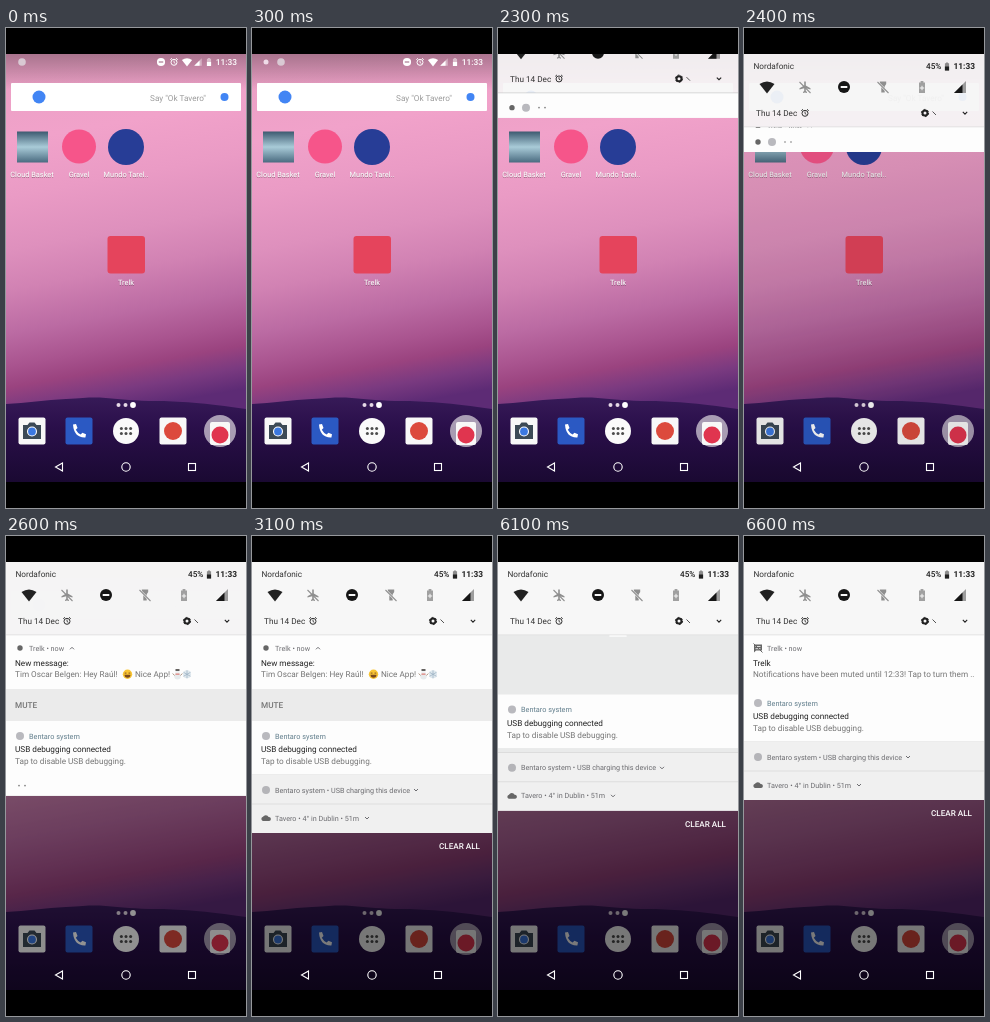
An HTML page that plays this animation: 240x480 px, repeating every 8000 ms.

```html
<!DOCTYPE html>
<html lang="en">
<head>
<meta charset="utf-8">
<title>Notification shade</title>
<style>
  html, body { margin: 0; width: 100%; height: 100%; overflow: hidden; background: #000; }
  svg { display: block; width: 100%; height: 100%; }
  text { font-family: Roboto, "Noto Sans", sans-serif; white-space: pre; text-rendering: geometricPrecision; }
</style>
</head>
<body>
<svg id="stage" viewBox="0 0 240 480" xmlns="http://www.w3.org/2000/svg"></svg>
<script>
const LOOP = 8000, STEP = 100;
const HEADER_END = 99, SHELF = 24, PEEK = 124, FULL = 297;
const INK = '#212121', GREY = '#757575', SMALL = '#6c6c70';

// Drawing helpers
const text = (x, y, str, size, fill, extra = '') =>
  `<text x="${x}" y="${y}" font-size="${size}" fill="${fill}" ${extra}>${str}</text>`;
const rect = (x, y, w, h, fill, extra = '') =>
  `<rect x="${x}" y="${y}" width="${w}" height="${h}" fill="${fill}" ${extra}/>`;
const dot = (x, y, r, fill, extra = '') =>
  `<circle cx="${x}" cy="${y}" r="${r}" fill="${fill}" ${extra}/>`;
const path = (d, fill, extra = '') => `<path d="${d}" fill="${fill}" ${extra}/>`;
const line = (d, color, width = 1) =>
  path(d, 'none', `stroke="${color}" stroke-width="${width}"`);
const at = (x, y, body, scale = 1) =>
  `<g transform="translate(${x} ${y}) scale(${scale})">${body}</g>`;
const group = (id, body, extra = '') => `<g id="${id}" ${extra}>${body}</g>`;
const medium = 'font-weight="500"';
const bold = 'font-weight="700"';
const middle = 'text-anchor="middle"';
const end = 'text-anchor="end"';

// Icons, each centred on 0,0
const wifi = c => path('M0 6.5L-7.5 -3Q0 -8 7.5 -3Z', c);
const signal = c => path('M-6 6H6V-6Z', c, 'opacity=".4"') + path('M-6 6H2.5V-2.5Z', c);
const battery = c => path('M-2.6 -4H-1.2V-5H1.2V-4H2.6V5H-2.6Z', c, 'opacity=".5"') +
  rect(-2.6, 0, 5.2, 5, c);
const batteryPlus = c => path('M-3 -4.6H-1.4V-6H1.4V-4.6H3V6H-3Z', c) +
  line('M0 -1.2V3.2M-2.2 1H2.2', '#f7f7f7', 1);
const noEntry = (c, bar) => dot(0, 0, 6, c) + rect(-3.3, -1, 6.6, 2, bar);
const alarm = c => dot(0, 0.3, 3, 'none', `stroke="${c}" stroke-width="1"`) +
  line('M0 -1.5V0.5L1.4 1.4M-3.8 -2.2L-2 -3.8M3.8 -2.2L2 -3.8', c, 0.9);
const chevron = (c, up) => line(up ? 'M-2 1L0 -1L2 1' : 'M-2 -1L0 1L2 -1', c, 1);
const plane = c => path('M-0.8 -5.5H0.8V-1.6L5.5 1.2V2.6L0.8 1.2V4L2 5V6L0 5.4L-2 6V5L-0.8 4V1.2L-5.5 2.6V1.2L-0.8 -1.6Z', c) +
  line('M-5.5 -5L5.5 6', c, 1.1);
const torch = c => path('M-3.2 -5.5H3.2V-3L1.7 -0.8V5.5H-1.7V-0.8L-3.2 -3Z', c) +
  line('M-5 -4.5L5 5.5', '#f7f7f7', 2.2) + line('M-5.5 -5L5.5 6', c, 1.1);
const gear = c => dot(0, 0, 2.5, 'none', `stroke="${c}" stroke-width="2"`) +
  dot(0, 0, 3.6, 'none', `stroke="${c}" stroke-width="1" stroke-dasharray="1.885"`);
const cloud = c => path('M-3.2 3A2.2 2.2 0 0 1 -3 -1.2A3.1 3.1 0 0 1 2.6 -1A2 2 0 0 1 3.2 3Z', c);
const ball = c => dot(0, 0, 4, c);
const muted = c => path('M-4 -3.5H4V2.5H-2L-4 4.5Z', c) +
  line('M-2.5 -1.5H2.5M-2.5 0.7H2.5', '#fdfdfd', 0.8) + line('M-4.5 -4.5L4.5 4.5', c, 1);

const label = (x, y, str) => text(x, y, str, 7.4, '#fff', `${middle} filter="url(#shade)"`);
const tile = (x, y, fill) => rect(x - 13.5, y - 13.5, 27, 27, fill, 'rx="2"');

function wallpaper() {
  return rect(0, 26, 240, 428, 'url(#sky)') + rect(0, 26, 240, 36, 'url(#scrim)') +
    path('M0 376C20 375 40 372 60 371S85 369 100 370S130 373 150 373S200 375 240 381V454H0Z', 'url(#hill)');
}

function homeStatus() {
  return group('newDot', dot(14, 34, 2.5, '#efdce8')) +
    group('oldDot', dot(0, 34, 3.8, '#d9c9d3')) +
    at(155, 34, noEntry('#fff', '#b48aa0'), 0.68) +
    at(168, 34, alarm('#fff')) + at(181, 34, wifi('#fff'), 0.68) +
    at(192, 34, signal('#fff'), 0.62) + at(203, 34, battery('#fff'), 0.8) +
    text(231, 37, '11:33', 8.4, '#fff', `${end} ${medium}`);
}

function homePage() {
  const apps = [[26, 'Cloud Basket'], [73, 'Gravel'], [120, 'Mundo Tarel..']];
  return rect(5, 55, 230, 28, '#fff', 'rx="1"') + dot(33, 69, 6.5, '#4285f4') +
    text(200, 72.8, 'Say "Ok Tavero"', 8.2, '#9b9b9b', end) + dot(218.5, 69, 4, '#4285f4') +
    rect(11, 103.5, 31, 31, 'url(#photo)') + dot(73, 118.5, 17, '#f6558a') +
    dot(120, 119, 18, '#273d96') +
    apps.map(([x, name]) => label(x, 149, name)).join('') +
    rect(101.5, 208, 37.5, 37.5, '#e5445c', 'rx="3"') + label(120, 256.5, 'Trelk');
}

function dock() {
  const gridDots = [-4.6, 0, 4.6].flatMap(x => [-2.4, 2.4].map(y => dot(120 + x, 403 + y, 1.5, '#4c4c4c')));
  return dot(112.5, 377, 2, '#e6d9e6') + dot(119.5, 377, 2, '#e6d9e6') + dot(127, 377, 2.9, '#fff') +
    tile(26, 403, '#f8f8f8') +
    path('M17 397H21.5L23.5 394.5H28.5L30.5 397H35V411H17Z', '#3c4a56') +
    dot(26, 403.5, 5, '#fff') + dot(26, 403.5, 3.9, '#3b78e0') +
    tile(73, 403, '#2b59c3') +
    path('M67 396.5L70 396L71.5 400L69.8 401.8Q71.5 405 74.6 406.5L76.4 404.7L80 406.2L79.4 409.4Q68 410 67 396.5Z', '#fff') +
    dot(120, 403, 13, '#fafafa') + gridDots.join('') +
    tile(167, 403, '#f8f8f8') + dot(167, 403, 9, '#dc4a3d') +
    dot(214, 403, 16, '#d9d2dc', 'opacity=".72"') +
    rect(204, 394, 20, 23, '#f8f8f8', 'rx="2"') + dot(214, 407, 8.5, '#e0354f');
}

function nav() {
  const stroke = 'stroke="#fff" stroke-width="1.1"';
  return path('M49.5 439L56.5 435V443Z', 'none', stroke) +
    dot(120, 439, 4.2, 'none', stroke) + rect(182.5, 435.5, 7, 7, 'none', stroke);
}

function header() {
  const toggles = [[23, wifi(INK)], [61, plane('#8f8f8f')], [100, noEntry('#161616', '#f7f7f7')],
    [139, torch('#8f8f8f')], [178, batteryPlus('#a0a0a0')], [216, signal('#161616')]];
  return rect(0, 26, 240, 73, '#f7f7f7', 'id="headerBg"') +
    text(9.5, 41, 'Nordafonic', 8.2, '#333') +
    text(182, 41, '45%', 8.2, INK, medium) + at(203, 38.5, battery(INK), 0.8) +
    text(231, 41, '11:33', 8.4, INK, `${end} ${bold}`) +
    toggles.map(([x, icon]) => at(x, 59, icon)).join('') +
    text(12, 88, 'Thu 14 Dec', 8.2, '#333') + at(61, 85, alarm('#333')) +
    at(181, 85, gear(INK)) + line('M188.5 83.5L192 87', '#555', 1) +
    at(221, 85, chevron(INK), 1.1) + rect(0, 98.5, 240, 0.8, '#dedede');
}

const face = dot(0, 0, 4.7, '#f9c534') + path('M-3 0.5H3A3 3 0 0 1 -3 0.5Z', '#7b4a1e') +
  line('M-2.8 -1.2H-1M1 -1.2H2.8', '#7b4a1e', 0.9);
const snowman = dot(0, 2, 3.2, '#e6eaec') + dot(0, -2, 2.2, '#eef1f2') +
  rect(-2, -5.2, 4, 1.8, '#55514f') + line('M-2 -0.2H2', '#d9534a', 0.9) +
  line('M-3 1.2L-4.8 -0.8M3 1.2L4.8 -0.8', '#8a6a50', 0.7);
const flake = dot(0, 0, 4, '#dfe8ee') +
  line('M0 -4V4M-3.5 -2L3.5 2M-3.5 2L3.5 -2', '#9fb4c4', 0.8);

function oldCard() {
  return dot(14, 112, 2.7, '#666') +
    text(23, 115, 'Trelk • now', 7.2, SMALL) + at(66, 112.3, chevron(SMALL, true)) +
    text(9, 130, 'New message:', 8.2, INK) +
    text(9, 141.3, 'Tim Oscar Belgen: Hey Raúl!', 8.2, GREY) +
    at(121.5, 138.3, face) + text(129, 141.3, 'Nice App!', 8.2, GREY) +
    at(171.5, 138.3, snowman) + at(181, 138.3, flake) +
    rect(0, 153, 240, 32, '#ebebeb') + rect(0, 153, 240, 32, '#000', 'id="ripple"') +
    text(9, 172, 'MUTE', 8.2, GREY, medium);
}

function newCard() {
  return at(14, 112, muted('#666')) +
    text(23, 115, 'Trelk • now', 7.2, SMALL) + text(9, 129.5, 'Trelk', 8.2, INK) +
    text(9, 141.3, 'Notifications have been muted until 12:33! Tap to turn them ..', 8.2, GREY);
}

function usbCard() {
  return rect(0, 185, 240, 53.5, '#fdfdfd') + at(14, 200, ball('#b9b9be')) +
    text(23, 202.7, 'Bentaro system', 7.3, '#607d8b') +
    text(9, 216, 'USB debugging connected', 8.2, INK) +
    text(9, 228, 'Tap to disable USB debugging.', 8.2, GREY);
}

function minorCards() {
  return rect(0, 238.5, 240, 58.5, '#f0f0f0') + rect(0, 238.2, 240, 0.8, '#d9d9d9') +
    rect(0, 267.6, 240, 0.8, '#d9d9d9') +
    at(14, 254, ball('#b4b4b8')) +
    text(23, 256.6, 'Bentaro system • USB charging this device', 7.2, SMALL) +
    at(164, 254, chevron(SMALL)) +
    at(14, 282, cloud('#666')) +
    text(23, 284.6, 'Tavero • 4° in Dublin • 51m', 7.2, SMALL) + at(115, 282, chevron(SMALL));
}

const shelfIcons = [dot(0, 0, 2.7, '#666'), ball('#b9b9be'), dot(-1, 0, 0.8, '#777'), dot(-9, 0, 0.8, '#777')];
const cardTops = [100, 185, 239, 268];

const gradient = (id, list, axis = 'x2="0" y2="1"') => `<linearGradient id="${id}" ${axis}>${
  list.map(([o, c, a = 1]) => `<stop offset="${o}" stop-color="${c}" stop-opacity="${a}"/>`).join('')}</linearGradient>`;

document.getElementById('stage').innerHTML = `<defs>
  ${gradient('sky', [[0, '#eaa0c4'], [0.2, '#f1a2ca'], [0.35, '#ea9bc5'], [0.5, '#de90bd'], [0.61, '#d182b3'],
    [0.73, '#bb6ba3'], [0.82, '#a9548f'], [0.88, '#9a437f'], [0.94, '#7a3a80'], [1, '#5d2b75']],
    'gradientUnits="userSpaceOnUse" x1="90" y1="26" x2="153" y2="376"')}
  ${gradient('scrim', [[0, '#000', 0.28], [1, '#000', 0]])}
  ${gradient('hill', [[0, '#371a58'], [0.35, '#2a0f4a'], [1, '#1a0932']])}
  ${gradient('photo', [[0, '#3c5a70'], [0.5, '#a9cbd8'], [1, '#4a6b80']])}
  <filter id="shade" x="-20%" y="-40%" width="140%" height="200%">
    <feDropShadow dx="0" dy=".6" stdDeviation=".6" flood-opacity=".6"/></filter>
  <clipPath id="panelClip"><rect id="panelBox" width="240"/></clipPath>
  <clipPath id="cardClip"><rect id="cardBox" y="99"/></clipPath>
</defs>` +
  wallpaper() + group('status', homeStatus()) + homePage() + dock() +
  rect(0, 26, 240, 428, '#000', 'id="dim"') + nav() +
  group('panel',
    rect(0, 26, 240, 428, '#e9eaea') +
    group('stack',
      group('minor', minorCards()) + group('usb', usbCard()) +
      group('first', rect(0, 99, 240, 86, '#fdfdfd') + group('before', oldCard()) + group('after', newCard()),
        'clip-path="url(#cardClip)"')) +
    group('shelf', rect(0, 0, 240, SHELF, '#fdfdfd') +
      shelfIcons.map((icon, i) => group('shelf' + i, icon)).join('')),
    'clip-path="url(#panelClip)"') +
  group('header', header()) +
  group('clear', text(228, 313, 'CLEAR ALL', 8.15, '#fff', `${end} ${medium}`)) +
  rect(0, 0, 240, 26, '#000') + rect(0, 454, 240, 26, '#000');

const el = id => document.getElementById(id);
const set = (id, attrs) => Object.entries(attrs).forEach(([k, v]) => el(id).setAttribute(k, v));
const move = (id, x, y) => set(id, { transform: `translate(${x} ${y})` });
const show = (id, on) => set(id, { visibility: on ? 'inherit' : 'hidden' });
const clamp = v => Math.max(0, Math.min(1, v));
const progress = (t, from, to) => clamp((t - from) / (to - from));

// cubic-bezier(.4, 0, .2, 1), solved by bisection
function ease(x) {
  let lo = 0, hi = 1;
  for (let i = 0; i < 20; i++) {
    const s = (lo + hi) / 2, r = 1 - s;
    if (1.2 * r * r * s + 0.6 * r * s * s + s ** 3 < x) lo = s; else hi = s;
  }
  return 3 * (1 - lo) * lo * lo + lo ** 3;
}

// The drag speeds up until the header is out, then the fling slows down
function panelBottom(t) {
  const drag = progress(t, 2000, 2400), fling = progress(t, 2400, 2900);
  return 26 + (PEEK - 26) * drag ** 1.5 + (FULL - PEEK) * (1 - (1 - fling) ** 3);
}

function drawPanel(t) {
  const bottom = panelBottom(t);
  const headerY = Math.min(0, bottom - PEEK);
  const usbY = -33 * ease(progress(t, 5912, 6272));
  const minorY = -33 * ease(progress(t, 5945, 6305));
  const top = HEADER_END + headerY;
  const open = progress(bottom, 26, FULL);

  show('panel', t > 2000);
  show('header', t > 2000);
  show('status', bottom < 50);
  set('panelBox', { y: top, height: Math.max(0, bottom + minorY - top) });
  set('headerBg', { opacity: 0.9 + 0.1 * open });
  set('dim', { opacity: 0.52 * progress(bottom, 90, FULL) });
  move('header', 0, headerY);
  move('stack', 0, -14 * clamp((152 - bottom) / 28));
  move('usb', 0, usbY);
  move('minor', 0, minorY);
  move('clear', 0, minorY);
  set('clear', { opacity: progress(t, 2600, 3000) });

  const shelfY = bottom - SHELF * clamp((FULL - bottom) / SHELF);
  const shelfOn = t < 2900;
  show('shelf', shelfOn);
  move('shelf', 0, shelfY);
  let slot = 0;
  cardTops.forEach((cardTop, i) => {
    const on = cardTop > shelfY - 4;
    show('shelf' + i, on && shelfOn);
    if (on) move('shelf' + i, 14 + 14 * slot++, 14);
  });
}

// The old card shrinks to its top centre, the new one grows from there
function drawFirstCard(t) {
  const replaced = t >= 6080;
  const size = ease(replaced ? progress(t, 6080, 6540) : 1 - progress(t, 5780, 6080));
  const width = 16 + 224 * clamp(size / 0.8);
  set('cardBox', { x: 120 - width / 2, width, height: 1.5 + (replaced ? 52.5 : 84.5) * size });
  show('before', !replaced);
  show('after', replaced);
  set('before', { opacity: size });
  set('after', { opacity: size });
  set('ripple', { opacity: 0.1 * progress(t, 5700, 5900) });
}

function draw(t) {
  const arrive = progress(t, 0, 300);
  set('newDot', { opacity: arrive });
  move('oldDot', 16 + 13 * arrive, 0);
  drawPanel(t);
  drawFirstCard(t);
}

const start = performance.now();
function tick() {
  const t = (performance.now() - start) % LOOP;
  draw(Math.floor(t / STEP) * STEP);
  requestAnimationFrame(tick);
}
tick();
</script>
</body>
</html>
```
